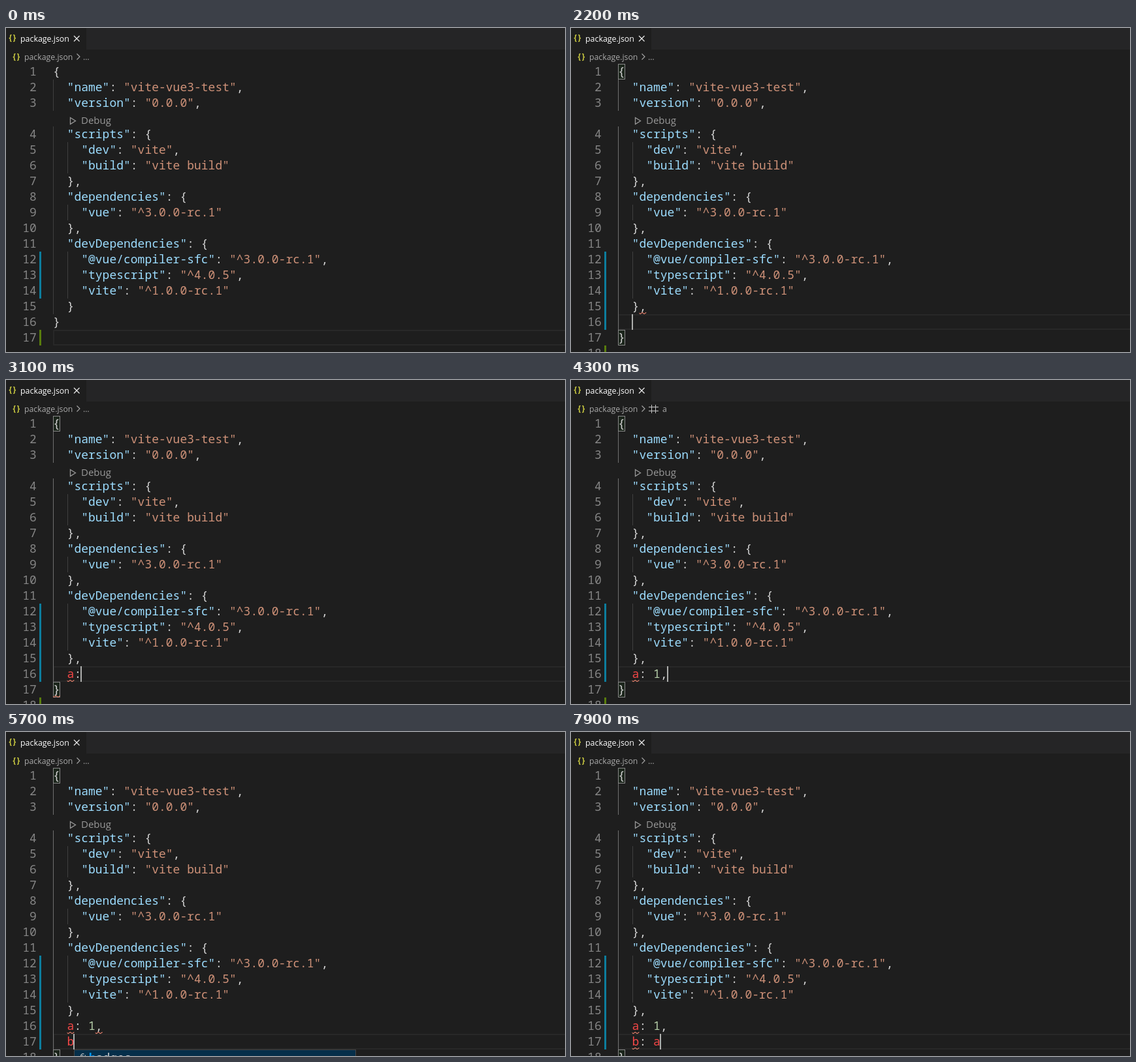
An HTML page with a canvas that plays this animation: 856x497 px, repeating every 8000 ms.

```html
<!DOCTYPE html>
<html lang="en">
<head>
<meta charset="utf-8">
<title>package.json</title>
<style>
  html, body { margin: 0; width: 100%; height: 100%; overflow: hidden; background: #1e1e1e; }
  canvas { display: block; }
</style>
</head>
<body>
<canvas id="stage" width="856" height="497"></canvas>
<script>
const ctx = document.getElementById('stage').getContext('2d');
const LOOP = 8000, LEFT = 72, TOP = 55, ROW = 24, CHAR = 10.8;
const MONO = '"Noto Sans Mono", monospace';
const UI = '"Open Sans", "Noto Sans", sans-serif';
const CODE = `500 18px ${MONO}`;
const C = {
  bg: '#1e1e1e', tabs: '#252526', key: '#9cdcfe', string: '#ce9178', number: '#b5cea8',
  plain: '#d4d4d4', bad: '#f44747', gutter: '#858585', guide: '#404040', activeGuide: '#707070',
  changed: '#0c7d9d', added: '#587c0c', error: '#f48771', json: '#cbcb41', crumb: '#a9a9a9'
};

const HEAD = `{
  "name": "vite-vue3-test",
  "version": "0.0.0",
  "scripts": {
    "dev": "vite",
    "build": "vite build"
  },
  "dependencies": {
    "vue": "^3.0.0-rc.1"
  },
  "devDependencies": {
    "@vue/compiler-sfc": "^3.0.0-rc.1",
    "typescript": "^4.0.5",
    "vite": "^1.0.0-rc.1"`.split('\n');

// Line and column of each matched bracket or squiggle: [line, col].
const START = {
  tail: ['  }', '}', ''], line: 17, col: 0, cursor: false, crumb: '…',
  changedTo: 14, addedAt: 17, match: [], squiggles: [], popup: null, hover: 0, scope: 0
};

const EVENTS = [
  [300, { hover: 0.2 }],
  [400, { hover: 0.4 }],
  [500, { hover: 0 }],
  [700, { line: 15, col: 3, cursor: true, match: [[11, 21], [15, 2]], scope: 2 }],
  [800, { crumb: 'devDependencies' }],
  [1100, { cursor: false }],
  [1500, { tail: ['  },', '}', ''], col: 4, cursor: true, match: [] }],
  [1600, { match: [[1, 0], [16, 0]], changedTo: 15, scope: 1 }],
  [1800, { tail: ['  },', '  ', '}', ''], line: 16, col: 2, addedAt: 18, match: [[1, 0], [17, 0]] }],
  [1900, { crumb: '…' }],
  [2000, { squiggles: [[15, 3]] }],
  [2200, { changedTo: 16 }],
  [2300, { tail: ['  },', '  a', '}', ''], col: 3, popup: ['activationEvents', 'author'] }],
  [2600, { squiggles: [] }],
  [2700, { squiggles: [[16, 2], [17, 0]], cursor: false }],
  [3100, { tail: ['  },', '  a:', '}', ''], col: 4, cursor: true, popup: null }],
  [3300, { tail: ['  },', '  a: ', '}', ''], col: 5 }],
  [3800, { tail: ['  },', '  a: 1', '}', ''], col: 6 }],
  [4100, { crumb: 'a', squiggles: [[16, 2]] }],
  [4300, { tail: ['  },', '  a: 1,', '}', ''], col: 7 }],
  [4600, { crumb: '…', squiggles: [[16, 2], [16, 6]] }],
  [4800, { tail: ['  },', '  a: 1,', '  ', '}'], line: 17, col: 2, addedAt: 19, match: [[1, 0], [18, 0]] }],
  [5000, { changedTo: 17 }],
  [5300, { cursor: false }],
  [5700, { tail: ['  },', '  a: 1,', '  b', '}'], col: 3, cursor: true, popup: ['badges'] }],
  [6000, { squiggles: [[16, 2]] }],
  [6100, { squiggles: [[16, 2], [17, 2]], cursor: false }],
  [6500, { tail: ['  },', '  a: 1,', '  b:', '}'], col: 4, cursor: true, popup: null }],
  [6700, { tail: ['  },', '  a: 1,', '  b: ', '}'], col: 5 }],
  [7200, { cursor: false }],
  [7600, { cursor: true }],
  [7900, { tail: ['  },', '  a: 1,', '  b: a', '}'], col: 6 }]
];

const stateAt = t => Object.assign({}, START, ...EVENTS.filter(e => e[0] <= t).map(e => e[1]));
// A code lens takes one row above line 4.
const lineTop = n => TOP + ROW * (n - 1 + (n > 3));
const colX = c => LEFT + c * CHAR;

function rect(x, y, w, h, color) {
  ctx.fillStyle = color;
  ctx.fillRect(x, y, w, h);
}

function text(s, x, y, color, font) {
  ctx.font = font;
  ctx.fillStyle = color;
  ctx.fillText(s, x, y);
}

function path(points, color, width = 1, close = false) {
  ctx.beginPath();
  points.forEach(([x, y]) => ctx.lineTo(x, y));
  if (close) ctx.closePath();
  ctx.strokeStyle = color;
  ctx.lineWidth = width;
  ctx.stroke();
}

function braces(x, y, color, size, weight) {
  text('{', x, y, color, `${weight} ${size}px ${MONO}`);
  text('}', x + size / 2 + 0.5, y, color, `${weight} ${size}px ${MONO}`);
}

function drawHeader(crumb) {
  rect(0, 0, 856, 33, C.tabs);
  rect(0, 0, 123, 33, C.bg);
  braces(3, 19, C.json, 12, 700);
  text('package.json', 22, 21, '#ffffff', `12.4px ${UI}`);
  path([[104, 12], [112.5, 20.5]], '#e8e8e8', 1.3);
  path([[112.5, 12], [104, 20.5]], '#e8e8e8', 1.3);

  const font = `12.3px ${UI}`;
  braces(9, 48, C.json, 12, 700);
  text('package.json', 28, 49, C.crumb, font);
  path([[108.5, 39.5], [113, 44], [108.5, 48.5]], C.crumb, 1.1);
  if (crumb === '…') {
    text(crumb, 118, 49, C.crumb, font);
    return;
  }
  if (crumb === 'a') {
    for (const x of [123.5, 129.5]) path([[x, 38], [x, 51]], '#c5c5c5');
    for (const y of [41.5, 47.5]) path([[119, y], [134, y]], '#c5c5c5');
  } else {
    braces(118, 48, '#c5c5c5', 13, 400);
  }
  text(crumb, 140, 49, C.crumb, font);
}

function drawCode(s, y) {
  const tokens = /("[^"]*")(?=:)|("[^"]*")|(\d+)|([a-z]+)|[^\s"\da-z]+/g;
  for (const m of s.matchAll(tokens)) {
    const color = m[1] ? C.key : m[2] ? C.string : m[3] ? C.number : m[4] ? C.bad : C.plain;
    text(m[0], colX(m.index), y, color, CODE);
  }
}

function drawGuides(lines, scope) {
  lines.forEach((s, i) => {
    const indent = s.search(/\S|$/), y = lineTop(i + 1);
    if (indent >= 2) rect(LEFT, y, 1, ROW, scope === 1 ? C.activeGuide : C.guide);
    if (indent >= 4) rect(94, y, 1, ROW, scope === 2 && i > 10 ? C.activeGuide : C.guide);
  });
}

function drawLens() {
  path([[98.5, 137.5], [106.5, 142.5], [98.5, 147.5]], '#999999', 1.3, true);
  text('Debug', 115, 147, '#999999', `15px ${UI}`);
}

function drawGutter(count, s) {
  ctx.textAlign = 'right';
  for (let n = 1; n <= count; n++) text(n, 46.8, lineTop(n) + 18, C.gutter, CODE);
  ctx.textAlign = 'left';

  const x = s.hover ? 48 : 51, w = s.hover ? 9 : 3;
  rect(x, lineTop(12), w, ROW * (s.changedTo - 11), C.changed);
  rect(x, lineTop(s.addedAt), w, ROW, C.added);
  if (s.hover) {
    ctx.globalAlpha = s.hover;
    for (const n of [1, 4, 8, 11]) {
      const y = lineTop(n) + 10.5;
      path([[57.5, y], [61.5, y + 4], [65.5, y]], '#c5c5c5', 1.2);
    }
    ctx.globalAlpha = 1;
  }
}

function drawMatch([line, col]) {
  const x = Math.round(colX(col)), y = lineTop(line);
  rect(x, y, 11, ROW, 'rgba(0,100,0,0.1)');
  ctx.strokeStyle = '#888888';
  ctx.lineWidth = 1;
  ctx.strokeRect(x + 0.5, y + 0.5, 10, ROW - 1);
}

function drawSquiggle([line, col]) {
  const x = colX(col), y = lineTop(line) + 21;
  ctx.save();
  ctx.beginPath();
  ctx.rect(x, y, CHAR, 3);
  ctx.clip();
  const wave = [];
  for (let i = -1; i < 6; i++) wave.push([x + 1.7 + i * 3, y + (i % 2 ? 0.4 : 2.6)]);
  path(wave, C.error, 1.1);
  ctx.restore();
}

function drawWrench(x, y, bg) {
  ctx.lineCap = 'round';
  path([[x - 5, y + 5], [x + 2, y - 2]], '#c5c5c5', 4);
  ctx.beginPath();
  ctx.arc(x + 3, y - 3, 3.4, -0.3, 5);
  ctx.strokeStyle = '#c5c5c5';
  ctx.lineWidth = 1.2;
  ctx.stroke();
  path([[x - 5, y + 5], [x + 2, y - 2]], bg, 1.8);
  ctx.lineCap = 'butt';
}

function drawPopup(items, y) {
  rect(104, y, 432, 60, '#454545');
  rect(105, y + 1, 430, 60, C.tabs);
  items.forEach((item, i) => {
    const top = y + 1 + i * ROW, bg = i ? C.tabs : '#062f4a';
    rect(105, top, 430, ROW, bg);
    drawWrench(115, top + 12, bg);
    text(item[0], 127, top + 18, '#0097fb', `700 18px ${MONO}`);
    text(item.slice(1), 127 + CHAR, top + 18, C.plain, CODE);
  });
}

function draw(t) {
  const s = stateAt(t), lines = HEAD.concat(s.tail), y = lineTop(s.line);
  rect(0, 0, 856, 497, C.bg);
  ctx.strokeStyle = '#282828';
  ctx.lineWidth = 2;
  ctx.strokeRect(LEFT + 1, y + 1, 800, ROW - 2);
  drawGuides(lines, s.scope);
  s.match.forEach(drawMatch);
  lines.forEach((line, i) => drawCode(line, lineTop(i + 1) + 18));
  drawLens();
  drawGutter(lines.length, s);
  s.squiggles.forEach(drawSquiggle);
  if (s.cursor) rect(Math.round(colX(s.col) - 1), y, 2, ROW, '#aeafad');
  if (s.popup) drawPopup(s.popup, y + ROW);
  drawHeader(s.crumb);
}

function tick() {
  draw(performance.now() % LOOP);
  requestAnimationFrame(tick);
}
tick();
</script>
</body>
</html>
```
